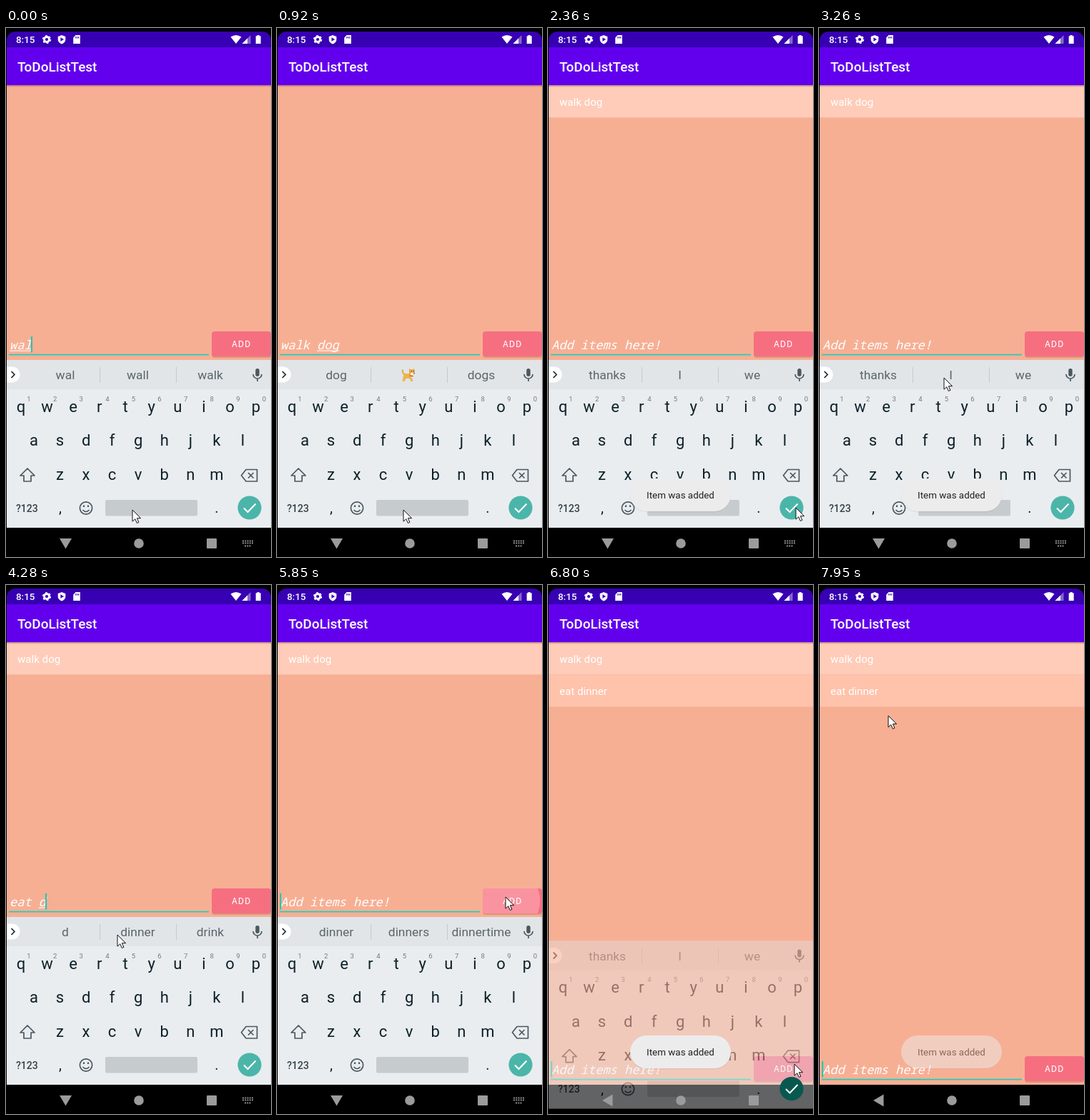
An HTML page that plays this animation: 371 px wide and 741 px high, repeating every 8000 ms.

```html
<!DOCTYPE html>
<html lang="en">
<head>
<meta charset="utf-8">
<title>To-do list</title>
<style>
  html, body { margin: 0; width: 100%; height: 100%; overflow: hidden; background: #000; }
  svg { display: block; width: 100vw; height: 100vh; font-family: Roboto, sans-serif; }
  text { white-space: pre; }
  .mid { text-anchor: middle; }
  .mono { font-family: "Noto Sans Mono", monospace; fill: #fff; }
  .field { font-size: 17px; font-style: italic; }
  .line { fill: none; stroke: #4b5860; stroke-width: 1.7; stroke-linejoin: round; }
</style>
</head>
<body>
<svg id="stage" viewBox="0 0 371 741"></svg>
<script>
const LOOP = 8000;
const CHAR = 10.2;

// time, typed text, three suggestions ("*" is the dog picture)
const TYPING = [
  [-60, "wal", "wal", "wall", "walk"],
  [60, "walk", "walk", "walks", "walking"],
  [150, "walk ", "to", "the", "in"],
  [240, "walk d", "d", "dog", "down"],
  [330, "walk do", "do", "dog", "down"],
  [420, "walk dog", "dog", "*", "dogs"],
  [1760, "", "dog", "*", "dogs"],
  [1880, "", "thanks", "I", "we"],
  [3620, "e", "e", "eat", "even"],
  [3740, "ea", "ea", "eat", "each"],
  [3860, "eat", "eat", "eats", "eating"],
  [3980, "eat ", "at", "the", "a"],
  [4160, "eat d", "d", "dinner", "drink"],
  [4400, "eat di", "di", "dinner", "did"],
  [4590, "eat din", "din", "dinner", "dinners"],
  [4680, "eat dinn", "dinn", "dinner", "dinners"],
  [4770, "eat dinne", "dinne", "dinner", "dinners"],
  [4950, "eat dinner", "dinner", "dinners", "dinnertime"],
  [5720, "", "dinner", "dinners", "dinnertime"],
  [5960, "", "thanks", "I", "we"]
];

// time, x, y of the mouse pointer
const POINTER = [
  [0, 177, 675], [1080, 177, 675], [1600, 306, 450], [1880, 306, 450],
  [2240, 347, 690], [2360, 347, 672], [2500, 347, 672], [3260, 175, 490],
  [3320, 168, 500], [3440, 156, 490], [5140, 156, 490], [5700, 320, 437],
  [5960, 320, 437], [6560, 345, 671], [6900, 345, 671], [7200, 190, 445],
  [7600, 190, 445], [7830, 97, 183]
];

// press, ripple centre, start of fade
const PRESSES = [[1600, 306, 1920], [5690, 320, 5900]];
const TOASTS = [1880, 5950];
const ITEMS = [["walk dog", 1880, "#feccb9"], ["eat dinner", 5960, "#ffc2ab"]];
const HIDE = 6720;

const clamp = v => Math.max(0, Math.min(1, v));
const ramp = (t, from, length) => clamp((t - from) / length);
const smooth = p => p * p * (3 - 2 * p);

const label = (x, y, size, content, attrs = "") =>
  `<text x="${x}" y="${y}" font-size="${size}" ${attrs}>${content}</text>`;
const box = (x, y, w, h, fill, attrs = "") =>
  `<rect x="${x}" y="${y}" width="${w}" height="${h}" fill="${fill}" ${attrs}/>`;

function statusBar() {
  return `<path d="M1 27V17A12 12 0 0 1 13 5H359A12 12 0 0 1 371 17V27Z" fill="#3700b3"/>
    <g fill="#fff">
      ${label(14, 21, 13.4, "8:15", 'font-weight="500"')}
      <circle cx="57" cy="16" r="3.5" fill="none" stroke="#fff" stroke-width="2.8"/>
      <circle cx="57" cy="16" r="5.2" fill="none" stroke="#fff" stroke-width="1.8" stroke-dasharray="2.7 2.745"/>
      <path d="M78 10l5.3 2v4c0 3.2-2.4 5.5-5.3 6.5c-2.9-1-5.3-3.3-5.3-6.5v-4z"/>
      <path d="M76.4 13.2v5.6l4.6-2.8z" fill="#3700b3"/>
      <path d="M97.5 10h6.3v12h-9.6v-8.6z"/>
      <path d="M97.7 12v2.6M99.7 12v2.6M101.7 12v2.6" stroke="#3700b3"/>
      <path d="M314.5 12.6q7.500-5 15 0L322 22z"/>
      <path d="M342.500 10v12h-12z" opacity=".4"/><path d="M338 14.500v7.500h-7.500z"/>
      <path d="M351.500 10h3.200v1.300h2v10.700h-7v-10.700h1.800z"/>
    </g>`;
}

function entryRow() {
  return `<g id="entry">
    ${box(4, 456.7, 280, 1.8, "#26cdb8")}
    <text id="typed" class="mono field" x="5" y="449.500"></text>
    ${box(5, 451.6, 0, 1, "#fff", 'id="underline"')}
    ${box(4, 432, 2, 22.5, "#1fc8b4", 'id="caret"')}
    ${box(288, 427, 83, 35, "#a4574f", 'rx="4" opacity=".3"')}
    ${box(288, 425, 83, 35, "#f66f80", 'rx="4"')}
    <g clip-path="url(#buttonClip)"><circle id="ripple" cy="442.500" fill="#fff"/></g>
    ${label(316, 447.300, 13.2, "ADD", 'class="mono" letter-spacing="1.18"')}
  </g>`;
}

function keyboard() {
  const row = (keys, x, y) => [...keys].map((k, i) =>
    label(x + i * 36.55, y, 22, k, 'class="mid"')).join("");
  const digits = [..."1234567890"].map((d, i) =>
    label(32 + i * 36.6, 522.500, 9.500, d, 'class="mid" fill="#727b80"')).join("");
  const words = [83, 184.500, 286].map((x, i) =>
    label(x, 492, 17.4, "", `id="word${i}" class="mid" fill="#5b656b"`)).join("");
  return `<g id="keyboard">
    ${box(1, 465, 370, 235, "#e9edf0")}
    ${box(1, 465, 370, 41, "#e1e5e8")}
    <path d="M131.500 475v22M238.500 475v22" stroke="#c5cacd"/>
    <path d="M1 474.500h7.500a11 11 0 0 1 0 22h-7.500z" fill="#fff"/>
    <path d="M7.500 481l4.500 4.500-4.500 4.500" class="line" style="stroke:#1c2529"/>
    ${words}
    <g id="dog">
      <path d="M179 485q-4-1-3-6.500" fill="none" stroke="#e5a743" stroke-width="2"/>
      <path d="M177.500 484h11v5l2 6h-3l-2-4h-5l-2 4h-3z" fill="#edb44f"/>
      <path d="M185 477l2 1.500h3l2-1.500 1 5-2.500 4-2.500 2-3-4z" fill="#e9a63e"/>
      <path d="M187 483h5v2.500l-4 1.500-1 4z" fill="#fff0d2"/>
      <path d="M188 480.500h1M191 480.500h1M191 484h2" stroke="#44352a"/>
      <path d="M185.500 487l5 .7" stroke="#d94d48" stroke-width="1.5"/>
    </g>
    <rect x="349.300" y="477" width="5.400" height="11" rx="2.700" fill="#4b5860"/>
    <path d="M346 485a6 6 0 0 0 12 0M352 491v4" class="line"/>
    <g fill="#0e2028">
      ${row("qwertyuiop", 21, 537.500)}${digits}
      ${row("asdfghjkl", 39, 585)}${row("zxcvbnm", 75.500, 632.500)}
      ${label(14, 677.500, 14, "?123", 'font-weight="500" fill="#364249"')}
      ${label(76, 679, 20, ",", 'class="mid"')}${label(295, 679, 20, ".", 'class="mid"')}
    </g>
    <g class="line">
      <path d="M30 617l10 10h-5v8h-10v-8h-5z"/>
      <path d="M336 618.500h15.500v16.500h-15.500l-6.500-8.250zM339 623l7.500 7.500m0-7.500l-7.500 7.500"/>
      <circle cx="112" cy="672.500" r="8.600"/>
      <path d="M107.500 675q4.500 5 9 0"/>
      <path d="M109 668.500v2.500M115 668.500v2.500" stroke-width="2.200"/>
    </g>
    ${box(139, 661, 129, 22.500, "#c6cbce", 'rx="2"')}
  </g>
  <g id="enter">
    <circle id="enterDisc" cx="341" cy="672" r="16.600"/>
    <path d="M333 672.500l5.500 5.500 11-11.500" fill="none" stroke="#fff" stroke-width="2"/>
  </g>`;
}

function navIcons() {
  return `<g fill="#9b9b9b">
    <path id="back" d="M-8.500-7h17L0 7.500z"/>
    <circle cx="186" cy="722" r="6.800"/>
    ${box(281, 715, 14, 14, "#9b9b9b", 'rx="1"')}
    <path id="imeIcon" d="M331 718.500h15M331 721.500h15M334 725.500h9" stroke="#8d8d8d"
      stroke-width="1.800" stroke-dasharray="2 1.250"/>
  </g>`;
}

const stage = document.getElementById("stage");
stage.innerHTML = `
  <defs>
    <clipPath id="buttonClip"><rect x="288" y="425" width="83" height="35" rx="4"/></clipPath>
    <linearGradient id="shade" x2="0" y2="1">
      <stop stop-color="#7b4a48" stop-opacity=".55"/><stop offset="1" stop-color="#7b4a48" stop-opacity="0"/>
    </linearGradient>
  </defs>
  ${box(0, 0, 371, 741, "#000")}
  ${statusBar()}
  ${box(1, 80, 370, 620, "#f7af94")}
  ${ITEMS.map(([name, , fill], i) => `<g id="item${i}">${box(1, 80 + i * 45.3, 370, 45.3, fill)}
    ${label(16, 108.500 + i * 45.3, 15.1, name, 'fill="#fff"')}</g>`).join("")}
  ${box(1, 80, 370, 3, "url(#shade)")}
  ${box(1, 27, 370, 53, "#6200ee")}
  ${label(16, 61, 18.9, "ToDoListTest", 'fill="#fff" font-weight="500"')}
  ${entryRow()}
  ${keyboard()}
  ${navIcons()}
  <g id="toast">
    ${box(114.500, 631.500, 142, 47, "#000", 'rx="23.500" opacity=".05"')}
    ${box(115, 631, 141, 46, "#ececed", 'rx="23"')}
    ${label(185.500, 659, 13.4, "Item was added", 'class="mid" fill="#202020"')}
  </g>
  <path id="pointer" d="M0 0V16.200L3.800 12.700 6.300 18.500 8.900 17.400 6.400 11.700H11.600Z"
    fill="#fff" stroke="#111" stroke-linejoin="round"/>`;

const el = {};
stage.querySelectorAll("[id]").forEach(node => el[node.id] = node);
const set = (id, attrs) => {
  for (const key in attrs) el[id].setAttribute(key, attrs[key]);
};
const show = (id, on) => set(id, { visibility: on ? "visible" : "hidden" });

function drawTyping(t) {
  const index = TYPING.findLastIndex(step => step[0] <= t);
  const [, text, ...words] = TYPING[index];
  let edit = index;
  while (edit > 0 && TYPING[edit - 1][1] === text) edit--;
  const start = text.lastIndexOf(" ") + 1;
  el.typed.textContent = text || "Add items here!";
  set("underline", { x: 5 + start * CHAR, width: (text.length - start) * CHAR });
  set("caret", { x: Math.round(4.3 + text.length * CHAR) });
  show("caret", Math.floor((t - TYPING[edit][0]) / 500) % 2 === 0);
  words.forEach((word, i) => el["word" + i].textContent = word === "*" ? "" : word);
  show("dog", words[1] === "*");
}

function drawRipple(t) {
  const [press, x, fade] = PRESSES.findLast(p => p[0] <= t) || [LOOP, 0, LOOP];
  const grown = Math.max(0, t - press);
  set("ripple", { cx: x, r: Math.min(90, grown * 0.3), opacity: 0.25 * (1 - ramp(t, fade, 420)) });
}

function drawPointer(t) {
  const i = POINTER.findLastIndex(p => p[0] <= t);
  const a = POINTER[i], b = POINTER[i + 1] || a;
  const p = a === b ? 0 : smooth((t - a[0]) / (b[0] - a[0]));
  const x = a[1] + (b[1] - a[1]) * p, y = a[2] + (b[2] - a[2]) * p;
  set("pointer", { transform: `translate(${Math.round(x)} ${Math.round(y)})` });
}

function draw(t) {
  drawTyping(t);
  drawRipple(t);
  drawPointer(t);
  ITEMS.forEach((item, i) => show("item" + i, t >= item[1]));

  const hidden = t >= HIDE;
  const away = ramp(t, HIDE, 140);
  const slide = `translate(0 ${58 * away})`;
  set("entry", { transform: `translate(0 ${hidden ? 235 : 0})` });
  set("keyboard", { transform: slide, opacity: 1 - away });
  set("enter", { transform: slide, opacity: away < 0.6 ? 1 : (1 - away) / 0.4 });
  set("enterDisc", { fill: hidden ? "#07594f" : "#4cb5a9" });
  set("back", { transform: `translate(83.500 722) rotate(${90 * ramp(t, HIDE, 80)})` });
  show("imeIcon", !hidden);

  const born = TOASTS.findLast(start => start <= t);
  set("toast", { opacity: born === undefined ? 0 : ramp(t, born, 200) * (1 - ramp(t, born + 1900, 200)) });
}

function frame(now) {
  draw(now % LOOP);
  requestAnimationFrame(frame);
}
draw(0);
requestAnimationFrame(frame);
</script>
</body>
</html>
```
